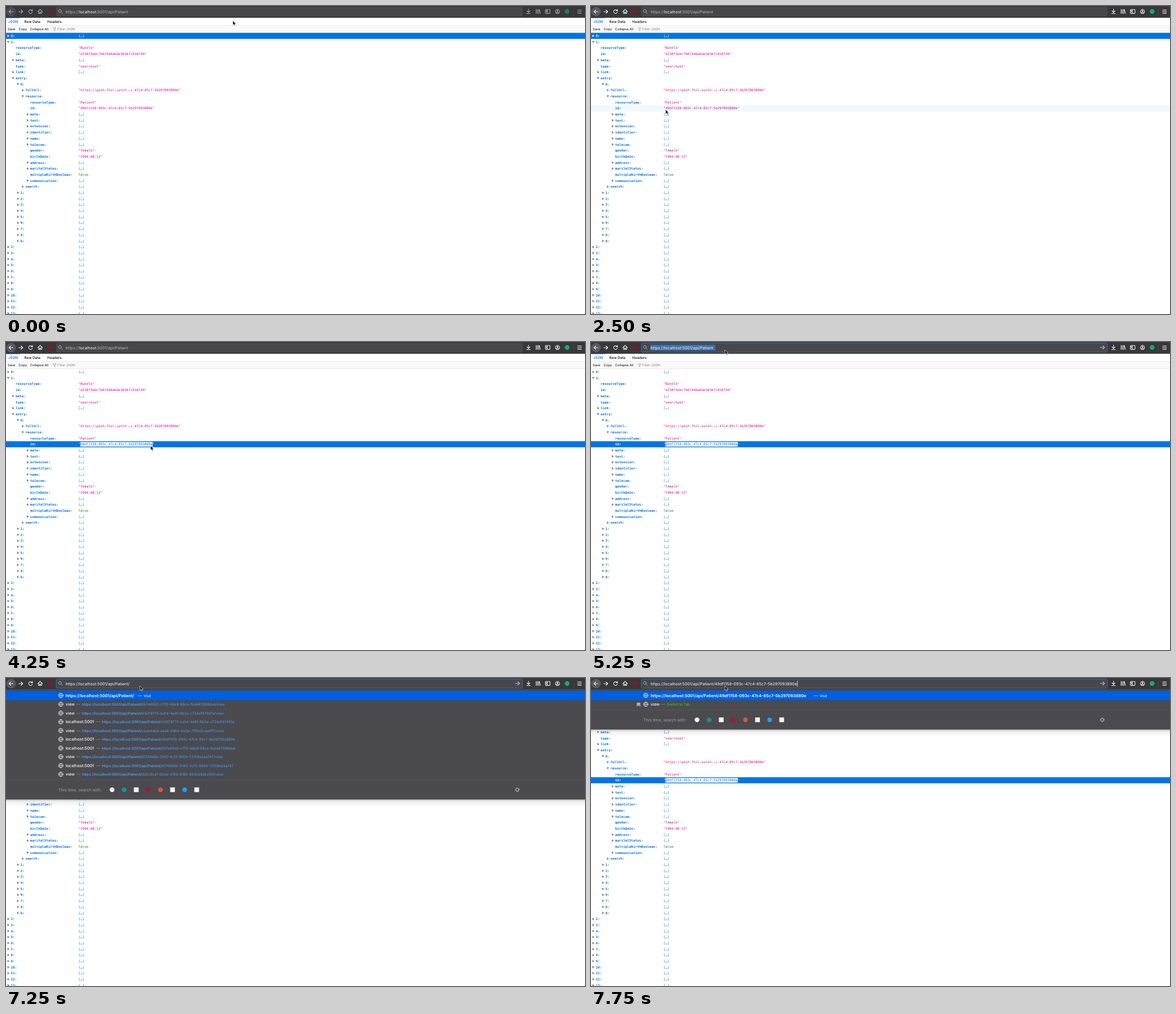
These frames come from a looping animation (1025 by 546 pixels, 8 s). An HTML page:

```html
<!DOCTYPE html>
<html lang="en">
<head>
<meta charset="utf-8">
<title>JSON viewer</title>
<style>
  html, body { margin: 0; width: 100%; height: 100%; overflow: hidden; background: #fff; }
  svg { display: block; width: 100%; height: 100%; }
  text { font-family: Inter, "Open Sans", sans-serif; text-rendering: geometricPrecision; white-space: pre; }
  .mono { font: 5.9px "DejaVu Sans Mono", monospace; }
  .key { font-weight: bold; }
  .icon { fill: none; stroke: #f0f0f2; stroke-width: 1.1; stroke-linecap: round; stroke-linejoin: round; }
</style>
</head>
<body>
<svg viewBox="0 0 1025 546" preserveAspectRatio="none">
  <defs>
    <linearGradient id="shade" x2="0" y2="1">
      <stop stop-color="#000" stop-opacity=".22"/>
      <stop offset=".3" stop-color="#000" stop-opacity=".06"/>
      <stop offset="1" stop-color="#000" stop-opacity="0"/>
    </linearGradient>
  </defs>
  <g id="page"></g>
  <g id="toolbar"></g>
  <g id="panel"></g>
  <path id="pointer" d="M0 0V8L1.9 6.3 3.2 9.2 4.6 8.6 3.4 5.8H5.8Z" fill="#111" stroke="#fff" stroke-width=".6"/>
</svg>
<script>
const STEP = 250, STEPS = 32;
const ROW = 10.69, FIRST_ROW = 53, CHAR = 3.552, VALUE_X = 128.2, ID_ROW = 12;
const BLUE = '#0074e8', PINK = '#dd00a9', GREEN = '#058b00';
const patientId = '49df1158-093c-47c4-85c7-5b297093880e';
const baseUrl = 'https://localhost:5001/api/Patient';
const el = id => document.getElementById(id);

const rect = (x, y, w, h, fill, extra = '') =>
  `<rect x="${x}" y="${y}" width="${w}" height="${h}" fill="${fill}" ${extra}/>`;
const circle = (x, y, r, fill, extra = '') =>
  `<circle cx="${x}" cy="${y}" r="${r}" fill="${fill}" ${extra}/>`;
const label = (x, y, size, fill, str, weight = 400, extra = '') =>
  `<text x="${x}" y="${y}" font-size="${size}" fill="${fill}" font-weight="${weight}" ${extra}>${str}</text>`;
const icon = (x, y, d, extra = '') =>
  `<path class="icon" transform="translate(${x} ${y})" d="${d}" ${extra}/>`;
const mono = (x, y, fill, str, extra = 'class="mono"') =>
  `<text x="${x}" y="${y}" fill="${fill}" ${extra}>${str}</text>`;

// Each row: depth, marker (+ closed, - open, . leaf), key, value
const range = (depth, from, to) =>
  Array.from({ length: to - from + 1 }, (_, i) => `${depth} + ${from + i} {…}`);
const rows = [
  '0 + 0 {…}', '0 - 1', '1 . resourceType "Bundle"',
  '1 . id "d238f3ebc7b67446a6de36367c918f49"',
  '1 + meta {…}', '1 . type "searchset"', '1 + link […]', '1 - entry', '2 - 0',
  '3 + fullUrl "https://gosh-fhir-synth.…c-47c4-85c7-5b297093880e"',
  '3 - resource', '4 . resourceType "Patient"', `4 . id "${patientId}"`,
  '4 + meta {…}', '4 + text {…}', '4 + extension […]', '4 + identifier […]',
  '4 + name […]', '4 + telecom […]', '4 . gender "female"',
  '4 . birthDate "1994-08-12"', '4 + address […]', '4 + maritalStatus {…}',
  '4 . multipleBirthBoolean false', '4 + communication […]', '3 + search {…}',
  ...range(2, 1, 9), ...range(0, 2, 13)
].map(line => line.split(' '));

const pointerPath = [
  [401.5, 26], [380, 45], [300, 110], [215, 175], [160, 199], [140, 190], [134, 184], [132.5, 183],
  [132, 183], [132, 183], [132, 183.5], [133.5, 183.5], [140, 184], [158, 184], [178.7, 184], [250, 184],
  [256, 184], [256, 184], [250, 112], [240, 36], [237, 14]
];

function stateAt(step) {
  const [x, y] = pointerPath[Math.min(step, pointerPath.length - 1)];
  const dragged = Math.round((x - VALUE_X - CHAR) / CHAR);
  const picked = step >= 17;
  const active = step >= 8;
  return {
    x, y, active,
    focused: step >= 20,
    selectedRow: picked ? ID_ROW : 0,
    hoverRow: active && y > 48 ? Math.round((y - FIRST_ROW) / ROW) : -1,
    chars: step < 11 ? 0 : step >= 16 ? patientId.length : dragged,
    url: step >= 30 ? `${baseUrl}/${patientId}` : step === 29 ? baseUrl + '/' : baseUrl,
    urlSelected: step === 21 || step === 22,
    caret: step === 23 || step === 24 || step === 27 || step === 28 || step === 31,
    panel: step < 29 ? '' : step < 31 ? 'history' : 'match'
  };
}

function jsonRow([depth, marker, key, value = ''], i, s) {
  const cy = FIRST_ROW + i * ROW, base = cy + 2.1, x = 8.4 + depth * 8.58;
  const selected = i === s.selectedRow;
  const tint = color => selected ? '#fff' : color;
  let out = '';
  if (selected || i === s.hoverRow)
    out += rect(0, cy - ROW / 2, 1025, ROW, selected ? BLUE : '#f0f9fe');
  if (marker !== '.') {
    const d = marker === '+' ? 'M-1.4-2.3L2 0-1.4 2.3Z' : 'M-2.4-1.5H2.4L0 1.9Z';
    out += `<path d="${d}" transform="translate(${x - 4.4} ${cy})" fill="${tint('#7b7b80')}"/>`;
  }
  out += mono(x, base, tint(BLUE), key + ':', 'class="mono key"');
  const color = tint(value[0] === '"' ? PINK : value === 'false' ? GREEN : BLUE);
  if (i === ID_ROW && s.chars) {
    out += rect(VALUE_X + CHAR, cy - 4, s.chars * CHAR, 8, selected ? '#fff' : BLUE);
    const marked = value.slice(1, 1 + s.chars);
    value = `"<tspan fill="${selected ? BLUE : '#fff'}">${marked}</tspan>${value.slice(1 + s.chars)}`;
  }
  const style = key === 'fullUrl' ? 'class="mono" style="font-style:italic"' : 'class="mono"';
  return out + mono(VALUE_X, base, color, value, style);
}

function drawPage(s) {
  const ink = '#0c0c0d';
  return rect(0, 20, 1025, 27.5, '#f9f9fa')
    + rect(0, 20, 1025, 14.3, '#fff')
    + rect(0, 34, 1025, .6, '#e0e0e2') + rect(0, 47, 1025, .6, '#e0e0e2')
    + rect(0, 20.5, 24.5, 1, '#0a84ff')
    + label(4, 30.2, 6.3, '#0060df', 'JSON', 500)
    + label(32.5, 30.2, 6.3, ink, 'Raw Data', 500)
    + label(73, 30.2, 6.3, ink, 'Headers', 500)
    + label(3, 43, 5.8, ink, 'Save') + label(22.6, 43, 5.8, ink, 'Copy')
    + label(42.8, 43, 5.8, ink, 'Collapse All')
    + rect(79.5, 36.5, .5, 9, '#e0e0e2')
    + icon(86, 41, 'M-2.5-2.3H2.5L.7.2V2.6L-.7 1.8V.2Z', 'style="stroke:#8a8a8f;stroke-width:.7"')
    + label(91, 43, 5.8, '#808085', 'Filter JSON')
    + rows.map((row, i) => jsonRow(row, i, s)).join('');
}

function drawToolbar(s) {
  const dim = s.active ? 1 : .6;
  const arrow = 'M-3.6 0H3.6M.6-3L3.6 0 .6 3';
  const icons = circle(9, 10, 7.8, '#58585c', 'stroke="#77777b" stroke-width=".6"')
    + icon(9, 10, 'M3.6 0H-3.6M-.6-3L-3.6 0-.6 3')
    + icon(26, 10, arrow)
    + icon(43.5, 9.7, 'M2.7-1.7A3.3 3.3 0 1 0 3.2 1M3.4-3.7V-1.2H.9')
    + icon(60.4, 9.7, 'M-4 .2L0-3.7 4 .2M-2.7-.6V3.6H-.8V1.2H.8V3.6H2.7V-.6')
    + circle(77.5, 10, 3.6, '#a00d1c')
    + icon(925, 9.5, 'M0-4V2M-2.6-.6L0 2 2.6-.6M-3.2 4H3.2')
    + icon(942, 9.7, 'M-3.5-3.6V3.6M-1.2-3.6V3.6M1.1-3.6V3.6M2.2-3.2L4 3.6')
    + icon(959, 9.7, 'M-3.2-3.4H3.2Q4-3.4 4-2.6V2.6Q4 3.4 3.2 3.4H-3.2Q-4 3.4-4 2.6V-2.6Q-4-3.4-3.2-3.4ZM-.8-3.4V3.4M-2.8-1.4H-2M-2.8.2H-2')
    + circle(976.3, 9.7, 3.7, 'none', 'class="icon"')
    + circle(976.3, 8.7, 1.4, '#f0f0f2')
    + icon(976.3, 9.7, 'M-2.2 2.2Q0 .6 2.2 2.2')
    + circle(993.3, 9.7, 4.2, '#12a986')
    + icon(1015.3, 9.8, 'M-3.3-2.8H3.3M-3.3 0H3.3M-3.3 2.8H3.3');
  const bright = '#f9f9fa', soft = '#b6b6b9';
  const url = s.focused ? s.url
    : `https://<tspan fill="${bright}">localhost</tspan>:5001/api/Patient`;
  return rect(0, 0, 1025, 20.5, '#38383a') + rect(0, 20, 1025, .6, '#222224')
    + rect(89, 2, 825, 16, '#474749', `rx="2" stroke="${s.focused ? '#2f70b8' : '#525255'}" stroke-width="${s.focused ? 1 : .6}"`)
    + `<g opacity="${dim}">${icons}</g>` + rect(1004.5, 3, .5, 14, '#4c4c4f')
    + icon(96.3, 9.6, 'M1.6-.8A2.5 2.5 0 1 1-3.4-.8 2.5 2.5 0 1 1 1.6-.8M1 1.1L3.8 3.9', 'style="stroke:#b1b1b3;stroke-width:.9"')
    + (s.focused ? icon(905.5, 9.7, arrow, 'style="stroke:#c5c5c8"') : '')
    + (s.urlSelected ? rect(105, 5, 115, 10, '#3f6fa8') : '')
    + label(105.4, 12.6, 7.1, s.focused ? bright : soft, url, 400, 'id="url"');
}

const globe = y => circle(97, y, 3.9, 'none', 'class="icon" style="stroke-width:.8"')
  + icon(97, y, 'M-3.9 0H3.9M0-3.9Q-3.6 0 0 3.9Q3.6 0 0-3.9', 'style="stroke-width:.7"');

const visited = [
  ['667e88d3-cf78-48e9-89ce-fbd487889deb', 1], ['43079775-bd14-4e91-8b3a-c724af87497e', 1],
  ['43079775-bd14-4e91-8b3a-c724af87497e', 0], ['caeb4daa-aed4-496e-be9a-7f60e5caa8f5', 1],
  [patientId, 0], ['667e88d3-cf78-48e9-89ce-fbd487889deb', 0],
  ['8f789d0b-3145-4cf2-8504-13159edaa747', 1], ['8f789d0b-3145-4cf2-8504-13159edaa747', 0],
  ['dd2c8ca1-02eb-4f8b-8195-883e29dbcfb7', 1]
];

function historyRow([id, isView], i) {
  const y = 46.6 + i * 15.52, x = isView ? 124.3 : 159.5;
  return globe(y)
    + label(105.4, y + 2.5, 7.25, '#f9f9fa', isView ? 'view' : 'localhost:5001', 500)
    + label(x, y + 2.4, 7.2, '#a0a0a5', '—')
    + label(x + 10.2, y + 2.4, 6.35, '#45a1ff',
      `<tspan font-weight="600">${baseUrl}/</tspan>${id}${isView ? '/view' : ''}`);
}

function engines(y) {
  const marks = ['#f4f4f4', '#0c9a8d', '', '#b3142b', '#de5833', '', '#1da1f2', ''];
  return marks.map((color, i) => {
    const x = 187.8 + i * 21.4;
    return color ? circle(x, y, 4.2, color) : rect(x - 4.2, y - 4.2, 8.4, 8.4, '#f4f4f4');
  }).join('');
}

function drawPanel(s) {
  if (!s.panel) return '';
  const full = s.panel === 'history';
  const bottom = full ? 215.5 : 91.5, foot = bottom - 17.4;
  const long = s.url.length > baseUrl.length + 1;
  const dashX = long ? 394.5 : 233.5;
  const results = full ? visited.map(historyRow).join('')
    : globe(46.6)
      + rect(81, 43.8, 6.2, 4.4, '#b1b1b3', 'rx=".5"') + rect(79.8, 48.6, 8.6, 1, '#b1b1b3')
      + label(105.4, 49.1, 7.25, '#f9f9fa', 'view', 500)
      + label(124.3, 49, 7.2, '#a0a0a5', '—')
      + label(134.5, 49, 6.35, '#30e60b', 'Switch to Tab');
  return rect(0, bottom, 1025, 13, 'url(#shade)')
    + rect(0, 20.5, 1025, bottom - 20.5, '#4a4a4f')
    + rect(0, 23, 1025, 16, '#0060df')
    + globe(31)
    + label(105.4, 33.6, 7.3, '#fff', s.url + (long ? '' : ''), 600)
    + label(dashX, 33.5, 7.2, '#dce8fa', '—')
    + label(dashX + 10.4, 33.5, 6.35, '#fff', 'Visit')
    + results
    + rect(0, bottom - 35, 1025, .6, '#5c5c61')
    + label(92.8, foot + 2.6, 7.2, '#a3a3a7', 'This time, search with:')
    + engines(foot)
    + circle(905.2, foot, 2.4, 'none', 'class="icon" style="stroke:#c5c5c8;stroke-width:.9"')
    + circle(905.2, foot, 3.5, 'none', 'stroke="#c5c5c8" stroke-width="1.2" stroke-dasharray="1.1 1.65"');
}

function render(step) {
  const s = stateAt(step);
  el('page').innerHTML = drawPage(s);
  el('toolbar').innerHTML = drawToolbar(s);
  el('panel').innerHTML = drawPanel(s);
  if (s.caret) {
    const end = 105.4 + el('url').getComputedTextLength();
    el('toolbar').insertAdjacentHTML('beforeend', rect(end + .2, 5, .8, 10, '#fff'));
  }
  el('pointer').setAttribute('transform', `translate(${s.x} ${s.y})`);
}

let shown = -1;
const start = performance.now();
function tick() {
  const step = Math.floor((performance.now() - start) / STEP) % STEPS;
  if (step !== shown) render(shown = step);
  requestAnimationFrame(tick);
}
tick();
</script>
</body>
</html>
```
